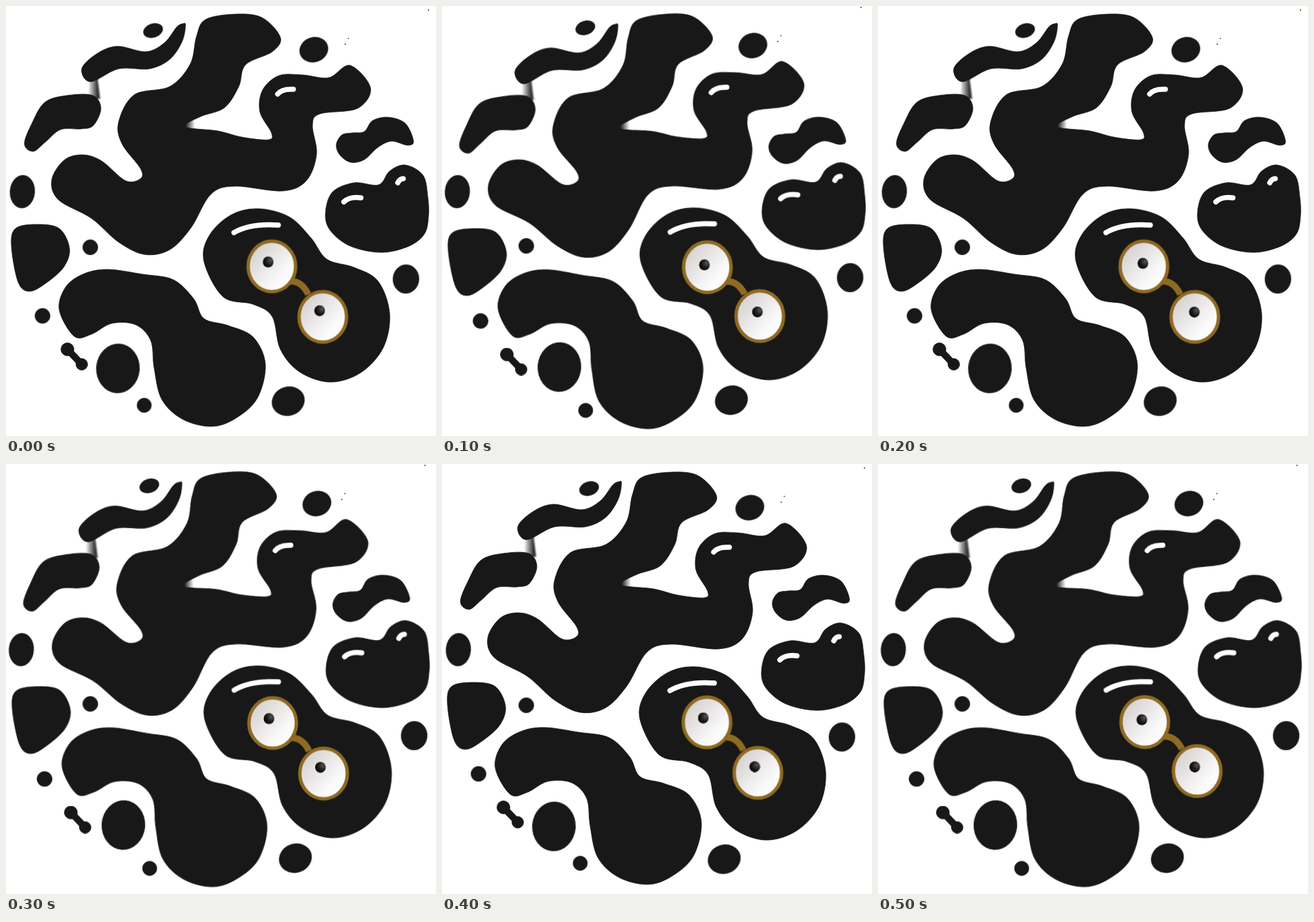
These frames come from a looping animation (630x630 px, 0.6 s). An HTML page:

```html
<!DOCTYPE html>
<html lang="en">
<head>
<meta charset="utf-8">
<title>Ink blobs</title>
<style>
html, body { margin: 0; width: 100%; height: 100%; overflow: hidden; background: #fff; }
svg { display: block; width: 630px; height: 630px; }
.ink { fill: #181818; stroke: #181818; stroke-width: .8; transform-box: fill-box; transform-origin: center; }
.shine { fill: none; stroke: #fff; stroke-width: 7.5; stroke-linecap: round; }
</style>
</head>
<body>
<svg id="stage" viewBox="0 0 630 630">
  <defs>
    <linearGradient id="lens" x1="0.15" y1="0.15" x2="0.85" y2="0.85">
      <stop offset="0" stop-color="#d6d3d2"/><stop offset="0.8" stop-color="#fcfbfb"/>
    </linearGradient>
    <radialGradient id="pupil" cx="0.72" cy="0.35" r="0.75">
      <stop offset="0" stop-color="#555"/><stop offset="0.55" stop-color="#1c1c1c"/><stop offset="1" stop-color="#050505"/>
    </radialGradient>
    <linearGradient id="neck">
      <stop offset="0" stop-color="#eee"/><stop offset="0.75" stop-color="#333"/>
    </linearGradient>
    <linearGradient id="tip">
      <stop offset="0.1" stop-color="#181818"/><stop offset="0.8" stop-color="#181818" stop-opacity="0"/>
    </linearGradient>
    <filter id="soft"><feGaussianBlur stdDeviation="1"/></filter>
  </defs>
</svg>
<script>
const NS = 'http://www.w3.org/2000/svg';
const GOLD = '#8f6a22', STEP = 100;
const stage = document.getElementById('stage');

function add(parent, tag, attrs = {}) {
  const el = document.createElementNS(NS, tag);
  for (const k in attrs) el.setAttribute(k, attrs[k]);
  return parent.appendChild(el);
}

// Closed Catmull-Rom curve through "x,y x,y ..." points
function smooth(text) {
  const p = text.trim().split(/\s+/).map(s => s.split(',').map(Number));
  const n = p.length, at = i => p[(i + n) % n];
  let d = 'M' + p[0];
  for (let i = 0; i < n; i++) {
    const [a, b, c, e] = [at(i - 1), at(i), at(i + 1), at(i + 2)];
    const c1 = b.map((v, k) => (v + (c[k] - a[k]) / 6).toFixed(2));
    const c2 = c.map((v, k) => (v - (e[k] - b[k]) / 6).toFixed(2));
    d += `C${c1} ${c2} ${c}`;
  }
  return d + 'Z';
}

// Holds each keyframe for one step, then jumps to the next
function hold(el, places) {
  const keys = [...places, places[0]].map(([x, y, a = 0], i) => ({
    transform: `translate(${x}px, ${y}px) rotate(${a}deg)`,
    easing: 'steps(1, end)', offset: i / places.length
  }));
  el.animate(keys, { duration: places.length * STEP, iterations: Infinity });
}

// A group of ink that wobbles between rest and a shift [dx, dy, turn]
function ink(shift, angle = 0) {
  const g = add(stage, 'g', { class: 'ink' });
  const [dx, dy, turn = 0] = shift;
  hold(g, [[0, 0, angle], [dx, dy, angle + turn]]);
  return g;
}

function blob(shift, outline, ...shines) {
  const g = ink(shift);
  add(g, 'path', { d: smooth(outline) });
  for (const d of shines) add(g, 'path', { d, class: 'shine' });
  return g;
}

function drop(cx, cy, rx, ry, dx, dy) {
  add(ink([dx, dy], rx > ry ? -18 : 4), 'ellipse', { cx, cy, rx, ry });
}

add(ink([-3.5, 2]), 'path', {
  d: 'M122 104H134L138 136H121Z', fill: 'url(#neck)', stroke: 'none', filter: 'url(#soft)'
});

const main = blob([-1.5, 1, -1.9],
  `335,12 375,17 402,46 390,67 351,86 341,118 320,149 285,162 262,177 310,183 345,192 384,196 389,186
   372,155 376,123 400,102 435,101 473,105 504,87 534,120 515,150 460,158 449,175 455,217 440,256
   405,271 335,264 300,276 271,325 240,357 203,364 165,346 125,311 77,284 67,255 85,226 112,218
   140,227 175,256 197,253 197,238 170,202 165,170 188,130 240,118 270,85 279,45 292,20`,
  'M398 129Q404 121 421 122');
add(main, 'ellipse', { cx: 271, cy: 175, rx: 10, ry: 9, fill: 'url(#tip)', stroke: 'none' });

blob([-4.5, 2, -1],
  `263,28 258,52 240,78 210,92 165,92 124,111 111,92 133,70 163,59 205,67 232,54 250,31 259,26`);
blob([-2, 2, -1],
  `127,131 139,150 128,175 110,180 80,181 58,199 40,213 27,202 38,172 57,141 90,131`);
blob([1.5, 6, -1],
  `8,352 14,326 45,320 78,326 93,355 85,382 60,405 35,418 18,405`);
blob([3, 2, 1.2],
  `78,445 88,411 115,392 150,386 200,393 245,401 275,429 290,458 325,468 362,485 380,525 368,575
   335,605 300,616 258,605 228,576 217,530 212,490 190,467 155,465 125,481 100,484`);
blob([2, -2.3, -1],
  `290,374 298,336 330,306 370,297 415,309 447,340 470,371 510,383 545,403 562,450 553,500 520,537
   475,551 430,536 402,503 390,455 362,437 318,426`,
  'M334 332Q358 318 399 321');
blob([1, -4, 0.8],
  `468,305 478,273 510,259 546,262 562,242 585,233 611,248 618,280 619,308 613,334 590,352 550,361
   505,352 476,330`,
  'M495 287Q503 279 520 281', 'M574 259Q577 253 582 253');
blob([-5.5, 0.5, -2],
  `484,203 492,189 507,186 525,184 537,168 560,163 585,172 597,198 588,204 565,198 545,207 525,225
   505,229 489,218`);

drop(215.5, 36, 14.5, 10, -5.5, -4);
drop(451, 64, 21, 18, 4.5, -6);
drop(24, 272, 18, 24, -1.5, 0);
drop(123.5, 353.5, 11, 11, 0, -2);
drop(53.5, 454, 11, 11, 3, 7.5);
drop(202.5, 585, 10.5, 10.5, 8, 7.5);
drop(164, 531, 31.5, 36, 8, -2);
drop(413.5, 579, 24, 21, 10.5, -1.5);
drop(586, 400, 19, 21, 12, -2);

const bone = ink([5, 7.5]);
add(bone, 'circle', { cx: 90, cy: 503, r: 9.5 });
add(bone, 'circle', { cx: 111, cy: 525, r: 8.5 });
add(bone, 'path', { d: 'M90 503L111 525', 'stroke-width': 10, style: 'stroke-width: 10' });

const specks = ink([-5, -4]);
for (const [cx, cy] of [[619, 6], [501.5, 47.5], [497, 56]])
  add(specks, 'circle', { cx, cy, r: .5 });

const glasses = add(stage, 'g');
add(glasses, 'path', { d: 'M-13-15Q6-17 16 4', fill: 'none', stroke: GOLD, 'stroke-width': 9.5 });
const eyes = [-1, 1].map(k => {
  add(glasses, 'ellipse', {
    cx: 37.3 * k, cy: 37 * k, rx: 34.8, ry: 36.9,
    fill: 'url(#lens)', stroke: GOLD, 'stroke-width': 5
  });
  return add(glasses, 'ellipse', {
    cx: 37.7 * k - 5, cy: 35.7 * k - 7.8, rx: 7.8, ry: 8, fill: 'url(#pupil)'
  });
});

hold(glasses, [
  [426.8, 418.5], [427.2, 418.5, -1.8], [426.8, 418.5],
  [428, 416.5], [425.5, 415.5], [429.2, 414, -1.7]
]);

const rest = [0, 0], down = [1.3, 2.9], aside = [4, 2];
for (const eye of eyes) hold(eye, [rest, down, aside, rest, rest, down]);
</script>
</body>
</html>
```
